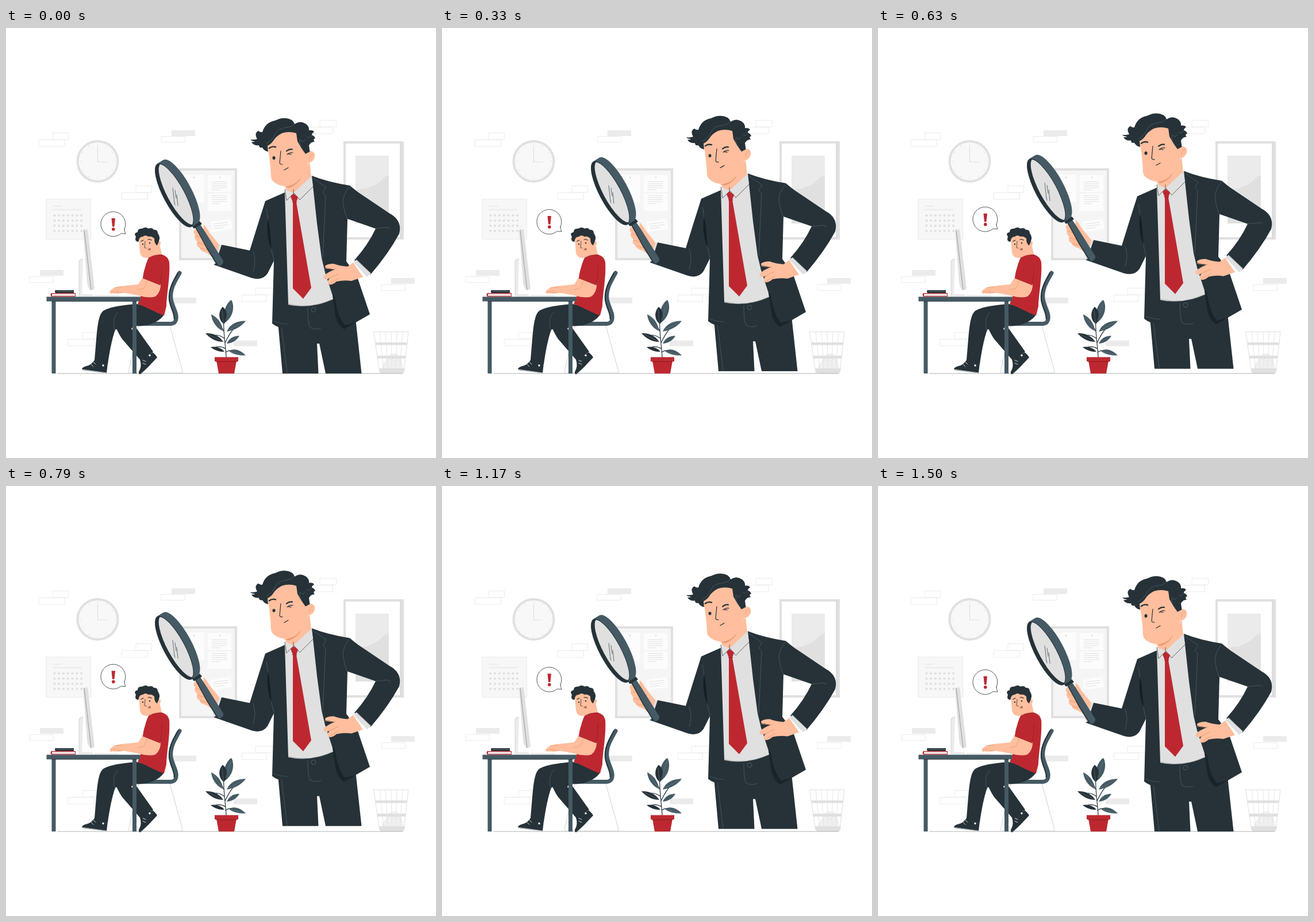
An HTML page with a canvas that plays this animation: 748 px wide and 748 px high, repeating every 1.54 s.

```html
<!DOCTYPE html>
<html lang="en">
<head>
<meta charset="utf-8">
<title>Under inspection</title>
<style>
html, body { margin: 0; width: 100%; height: 100%; overflow: hidden; background: #fff; }
canvas { display: block; width: 748px; height: 748px; }
</style>
</head>
<body>
<canvas id="stage" width="748" height="748"></canvas>
<script>
const stage = document.getElementById('stage');
let ctx = stage.getContext('2d');

const DARK = '#263238', SLATE = '#455a64', RED = '#bd2830', SKIN = '#ffbe9d', SHADE = '#eb996e';
const G1 = '#f7f7f7', G2 = '#ebebeb', G3 = '#e0e0e0';

function fill(d, color) {
  ctx.fillStyle = color;
  ctx.fill(new Path2D(d));
}
function line(d, color = DARK, width = 1) {
  ctx.strokeStyle = color;
  ctx.lineWidth = width;
  ctx.stroke(new Path2D(d));
}
function box(x, y, w, h, color) {
  ctx.fillStyle = color;
  ctx.fillRect(x, y, w, h);
}
function frame(x, y, w, h, color = G2, width = 1) {
  ctx.strokeStyle = color;
  ctx.lineWidth = width;
  ctx.strokeRect(x, y, w, h);
}
function oval(x, y, rx, ry, angle, color) {
  ctx.fillStyle = color;
  ctx.beginPath();
  ctx.ellipse(x, y, rx, ry, angle, 0, Math.PI * 2);
  ctx.fill();
}
const dot = (x, y, r, color) => oval(x, y, r, r, 0, color);

function bricks() {
  [[81, 182, 27], [57, 194, 45], [226, 274, 27], [201, 286, 45], [546, 160, 28], [524, 172, 44],
   [133, 529, 27], [108, 541, 45], [434, 452, 41], [410, 464, 43]]
    .forEach(([x, y, w]) => frame(x + .5, y + .5, w, 11.5));
  [[270, 188], [41, 432], [653, 446]].forEach(([x, y]) => frame(x + .5, y + .5, 41, 10));
  [[288, 178], [59, 421], [290, 469], [396, 543.5], [670, 435]]
    .forEach(([x, y]) => box(x, y, 41, 10, G2));
}

function clock() {
  dot(159.5, 232, 37, G3);
  dot(159.5, 232, 33, '#f8f8f8');
  for (let i = 0; i < 12; i++) {
    const a = i * Math.PI / 6, c = Math.cos(a), s = Math.sin(a);
    line(`M${159.5 + 29 * c},${232 + 29 * s}L${159.5 + 31 * c},${232 + 31 * s}`, G3);
  }
  line('M159.5,206V233H175', G3, 1.2);
}

function calendar() {
  box(70, 297, 78, 71, G1);
  frame(70.5, 297.5, 77, 70, G2);
  line('M82,310H97M82,316H131', G3);
  for (let i = 0; i < 28; i++) dot(84.3 + i % 7 * 7.8, 326 + Math.floor(i / 7) * 9, 2.1, G3);
}

function noticeBoard() {
  box(301, 244, 101, 160, G3);
  box(305, 248, 93, 152, '#f5f5f5');
  box(313, 255, 32, 48, '#fcfcfc');
  box(351, 256, 41, 29, '#fcfcfc');
  box(351, 288, 41, 30, '#fcfcfc');
  fill('M356,337L391,332L393,350L358,355Z', '#fcfcfc');
  for (let i = 0; i < 5; i++) {
    const end = i === 4 ? 372 : 384;
    line(`M358,${267.5 + i * 3.5}H${end}M358,${291.5 + i * 3.5}H${end}`, G3);
  }
  line('M361,341L386,338M361,345L387,342M362,349L379,347', G3);
  dot(372, 260, 1.5, G3);
  dot(327, 260, 1.5, G3);
}

function picture() {
  box(587, 197, 105, 171, G3);
  box(591, 201, 94, 163, '#fff');
  line('M687,198V367', '#d8d8d8');
  box(608, 222, 58, 118, G2);
  fill('M608,284C618,276 625,283 633,276C642,274 647,270 653,265C657,259 661,258 666,256V340H608Z', G3);
}

function bin() {
  fill('M654,592C654,583 660,583 661,577C665,567 673,564 680,567C687,569 689,579 691,592Z', '#f0f0f0');
  line('M663,580L669,572L675,580L683,573L688,585', G3, .7);
  line('M640,528.5H700L692,598Q692,600 689,600H653Q650,600 649.5,597Z', G3);
  for (let i = 1; i < 6; i++) line(`M${640 + i * 10},529L${650 + i * 7},593`, G3, .8);
  fill('M642,547H698L697.5,551.5H642.5ZM645,570H695.5L695,575H645.5ZM649,592H694Q693,601 688,601H654Q650,601 649,592Z', G3);
}

function chair() {
  line('M231,518L213,598Q213,600 216,600H305Q308,600 307,597L285,518', '#cfd3d5', 1);
  line('M302,426C295,439 285,453 287,471C289,485 299,497 295.5,508Q294,514 287,514.5H231', SLATE, 7);
  line('M299,426C291,440 282,456 284,473C286,487 294,498 292.5,506', DARK, 2);
}

function worker() {
  // legs
  fill('M227,480C204,482 178,485 168,493C158,503 158,537 154,578L177,585C180,564 184,542 190,525L225,508L272,502L275,491Z', DARK);
  fill('M274,494C260,486 205,483 191,495C183,504 190,522 202,541L234,578L256,563L224,518C240,520 263,515 274,500Z', DARK);
  line('M190,527C185,516 187,500 195,494', '#53636a', .7);
  fill('M155,576L177,583L175,600.5L133,595Q130,592 137,589Q149,587 155,576Z', DARK);
  fill('M233,577L255,564Q261,569 263,573L248,589L235,602Q231,604 231,598Q237,588 233,577Z', DARK);
  line('M132,594L175,600M263,574L248,590L233,603', '#fff', .8);
  line('M148,585l4,4M152,581l4,4M238,578l5,2M238,583l5,2', '#fff', .8);
  [[169, 587], [250, 569.5], [220, 523]].forEach(([x, y]) => dot(x, y, 1.7, '#fff'));

  // far arm
  fill('M243,426L230,446L200,449Q190,449 180,459L194,462L239,457L252,439Z', SKIN);

  // shirt and neck
  fill('M250,396C256,393 263,392 271,394Q282,397 284,407C286,432 279,466 279,484L275,500C262,496 246,486 229,480C238,463 238,441 239,433Q242,409 250,396Z', RED);
  fill('M248,388L267,376L271,394Q261,394 250,399Z', SKIN);
  line('M250,398Q260,394 271,395', '#8b1c24', .8);

  // near arm
  fill('M239,432L269,443Q270,459 260,467Q250,471 229,465L202,460L182,462Q177,459 189,451L202,450L231,450Z', SKIN);
  fill('M250,405Q264,400 272,413Q272,430 268,447L238,435Q240,414 250,405Z', RED);
  line('M238,435L268,447Q272,431 271,414', '#8b1c24', .7);
  line('M183,459L195,457M188,461L202,460M190,452L202,451M246,440L240,453L229,455', SHADE, .7);

  // head
  fill('M231,366Q238,357 262,363L266,371C270,370 271,377 265,380Q263,385 263,389C255,396 250,400 243,400Q234,399 233,390Z', SKIN);
  fill('M229,372Q223,370 226,363Q221,357 229,355Q229,348 237,349Q243,345 248,349Q254,346 257,351Q264,350 264,357Q269,363 266,371L263,378Q258,376 258,366Q253,361 248,363Q242,359 238,363Q231,363 231,371Z', DARK);
  line('M235,371l4,-2M247,368q4,-1 6,1', DARK, 1.2);
  dot(238, 376, 1.2, DARK);
  dot(250, 374, 1.2, DARK);
  line('M242,371L241,382L244,383M247,386Q249,382 251,384', DARK, .8);
  oval(250, 385, 1.7, 2, 0, '#b36b50');
}

function desk() {
  fill('M127,405Q128,401 134,402L132,463H149Q152,464 152,467H127Z', G2);
  line('M127,466V407Q127,402 134,402', '#cfcfcf', .8);
  fill('M134,352Q135,350 142,350L154,453Q153,456 147,456Q141,450 141,441Z', G3);
  line('M136,352L148,455', '#888', .8);
  box(154, 464.5, 42, 2.5, G2);
  fill('M86,456H118V461H86Q84,458 86,456Z', DARK);
  fill('M79,461H121V467.5H79Q76,464 79,461Z', RED);
  box(80, 462.3, 40, 3.8, '#f0e4e4');
  box(88, 457.5, 29, 1, '#667880');
  box(79.5, 475, 7, 126, SLATE);
  box(220, 475, 7, 126, SLATE);
  box(70.5, 467.5, 163, 8, SLATE);
  line('M80,475.5H227', DARK, .8);
}

function plant() {
  line('M383,573C382,550 377,527 379,500M381,548Q389,530 399,520M382,564Q389,559 398,562M382,558Q374,553 365,555M380,540Q374,535 365,534M379,528L369,508', DARK, 1.2);
  const leaves = [
    ['M380,513C376,498 382,479 392,473C399,485 394,505 380,513Z', SLATE],
    ['M379,515C370,509 368,494 377,485C386,492 387,506 379,515Z', DARK],
    ['M377,527C365,521 358,510 357,498C369,504 376,514 377,527Z', SLATE],
    ['M384,528C389,515 403,509 417,509.5C410,519 398,526 384,528Z', SLATE],
    ['M378,546C366,546 355,540 347,531C360,530 372,536 378,546Z', DARK],
    ['M380,563C371,564 362,560 356,555C367,553 375,557 380,563Z', DARK],
    ['M384,549C388,540 396,535 406,535.5C401,544 394,548 384,549Z', SLATE],
    ['M388,562C396,556 408,560 417,569.5C406,570 395,568 388,562Z', SLATE]
  ];
  leaves.forEach(([d, color]) => fill(d, color));
  line('M382,508L391,480M378,513L376,490M376,525L361,502M386,526L412,512M376,545L352,533M390,563L411,568', '#778890', .5);
  fill('M366,579H401L397,601H370Z', RED);
  box(363, 572.5, 41, 7.5, RED);
  line('M366,580.5H401', '#8b1c24', 1);
}

function bossBody() {
  const seam = '#53656e';
  // trousers
  fill('M472,500L491,470H590L608,505L618.5,601H556L545,549H541L543.5,601H481Z', DARK);
  // shirt
  fill('M485,280L531,257L538,262L571,471Q530,490 489,481Z', G3);
  line('M491,480Q530,490 568,472', '#8a9296', .6);
  ctx.strokeStyle = seam;
  ctx.lineWidth = .8;
  ctx.beginPath();
  ctx.arc(535, 490, 4, 0, 7);
  ctx.stroke();
  line('M525,487Q525,515 529,521Q538,526 548,522M479,518L489,600', seam, .7);

  // holding arm and jacket panel
  fill('M485,286L451,301Q445,320 438,342L424,387L375,377L362,412L428,435Q446,440 455,427L466,405L463,514Q475,524 490,521L491,480Z', DARK);
  line('M453,315Q458,341 456,352Q459,378 466,404M430,388Q436,405 430,423', seam, .7);
  fill('M456,331C453,350 455,370 462,386L459,350Z', '#151e22');
  line('M466,510Q478,515 490,515', seam, .6);

  // hip arm and jacket panel
  fill('M532,257Q560,268 598,274Q605,280 613,286L668,323C683,331 688,344 684,358Q665,393 634,429L606,404Q630,377 643,349L594,332L592,406L610,430L633,498L588,524Q575,515 573,500L568,465L555,425L549,400L541,340Z', DARK);
  line('M535,262L557,277L551,286L556,292L551,400M598,275Q586,290 586,303Q589,322 594,333M643,349L662,347Q667,347 669,349', seam, .7);
  fill('M568,463L573,500Q576,516 588,524L609,512L590,517Q577,503 572,468Z', '#1a2428');
}

function bossHip() {
  fill('M604,407L610,403L635,427L628,433Z', G3);
  line('M610,404L635,427', '#8a9296', .6);
  fill('M604,408L594,415Q580,414 570,410Q559,410 555,414Q554,418 562,418L572,420Q561,424 554,430Q550,434 555,437Q558,438 563,435Q557,442 562,446Q567,448 575,441Q588,438 601,440L621,433Z', SKIN);
  line('M563,435L578,428M565,444L579,435M555,418L574,420', SHADE, .9);
}

function bossHead() {
  // neck and jaw
  fill('M486,272L514,258L528,232L531,259Q518,279 500,287L487,283Z', SKIN);
  fill('M482,276Q500,276 514,259Q508,272 493,278Z', SHADE);
  fill('M455,207C459,196 470,186 484,180H507L526,214C534,213 539,218 537,225Q534,234 526,234Q520,254 506,268Q492,278 478,274Q462,269 461,259Q460,232 455,207Z', SKIN);
  line('M534,219Q528,220 528,228', SHADE, .8);
  // hair
  fill('M425,194Q431,195 437,193Q431,183 439,179Q443,182 446,181Q451,164 468,161Q484,153 497,160Q501,163 502,167Q512,160 522,167Q528,172 527,178Q534,177 536,181Q532,183 532,186Q537,188 538,192Q533,193 537,198Q531,197 527,204L528.5,215L521,219Q513,209 507,197L505,183Q492,179 480,183Q470,188 465,196Q462,201 455,205L456,215Q449,214 446,208Q440,209 440,204Q430,205 427,198Q431,199 433,197Q427,197 425,194Z', DARK);
  line('M453,201Q463,196 468,185Q473,174 489,173Q500,171 501,166M511,195Q510,204 516,211M512,194Q516,201 520,194M523,189Q527,194 531,187', '#5a6d76', .6);
  // features
  line('M458,209Q463,205 469,207', DARK, 2.4);
  line('M488,214Q493,210 498,211', DARK, 2.2);
  line('M489,220Q494,216 499,217M490,219L496,220', DARK, 1.2);
  oval(466, 226, 2.5, 2.9, 0, DARK);
  line('M478,214L476,235Q478,238 481,237M484,247L491,243', DARK, 1.2);
  // collar and tie
  fill('M485,280L500,287L531,258L534,275L511,299L502,288L488,300Z', G3);
  line('M485,281L488,300L501,287L511,299L534,276M500,281V287', '#3a454a', .8);
  fill('M495,293L500,288L508,294L505,303L531,452L517,471L499,453V303Z', RED);
  line('M498,303H506', '#8b1c24', .8);
}

function magnifier() {
  const tilt = 1.077;
  // hand and cuff
  fill('M369,377L375,377L364,411L359,405Z', G3);
  fill('M344,342Q350,348 354,356L371,377L364,402L349,391Q338,388 337,383Q329,378 333,372Q326,365 329,360Q324,354 329,350Q334,346 343,353Z', SKIN);
  line('M330,361L342,366M333,373L346,377M338,383L350,386', SHADE, .9);
  // handle
  fill('M329,347L338,342L346,354L378,405Q379,412 371,414L366,411L350,385L344,372Z', SLATE);
  line('M330,347L349,382L368,412', DARK, 1.5);
  fill('M323,344L337,336L341,341L327,349Z', DARK);
  // rim, then the lens set back inside it
  for (let i = 10; i >= 0; i--) oval(293 + i * 1.05, 291 - i * .65, 62.5, 19, tilt, SLATE);
  oval(293, 291, 62, 18.5, tilt, DARK);
  ctx.save();
  ctx.beginPath();
  ctx.ellipse(293, 291, 60.5, 17.5, tilt, 0, 7);
  ctx.clip();
  oval(298, 288.5, 60, 17.5, tilt, G3);
  ctx.restore();
  line('M290,278L293,304M294,282L296,296M297,290L299,309M293,304L294,308', '#536068', .9);
}

function bubble() {
  const d = 'M206,350A21.5,21.5 0 1 0 200.3,357.5Q204,358 208,358Q206.5,355 206,350Z';
  fill(d, '#fff');
  line(d, DARK, .8);
  fill('M183.5,331H190L188.5,345.5H185Z', RED);
  dot(186.8, 350, 2.8, RED);
}

// The room never changes, so it is painted once.
const room = document.createElement('canvas');
room.width = room.height = 748;
const screen = ctx;
ctx = room.getContext('2d');
ctx.lineCap = ctx.lineJoin = 'round';
box(0, 0, 748, 748, '#fff');
[bricks, clock, calendar, noticeBoard, picture, bin].forEach(draw => draw());
line('M90,601H690', '#aab3b5', 1);
[chair, worker, desk, plant].forEach(draw => draw());
ctx = screen;
ctx.lineCap = ctx.lineJoin = 'round';

const LOOP = 1540, STEPS = 36, RISE = 10;
function render(now) {
  const step = Math.min(STEPS, Math.floor(now % LOOP * 0.024 + 0.06));
  const lift = RISE * (1 - Math.abs(step / (STEPS / 2) - 1));
  ctx.drawImage(room, 0, 0);
  ctx.save();
  ctx.translate(0, -lift);
  [bossBody, bossHip, bossHead, magnifier, bubble].forEach(draw => draw());
  ctx.restore();
}

let start;
function tick(now) {
  start ??= now;
  render(now - start);
  requestAnimationFrame(tick);
}
render(0);
requestAnimationFrame(tick);
</script>
</body>
</html>
```
